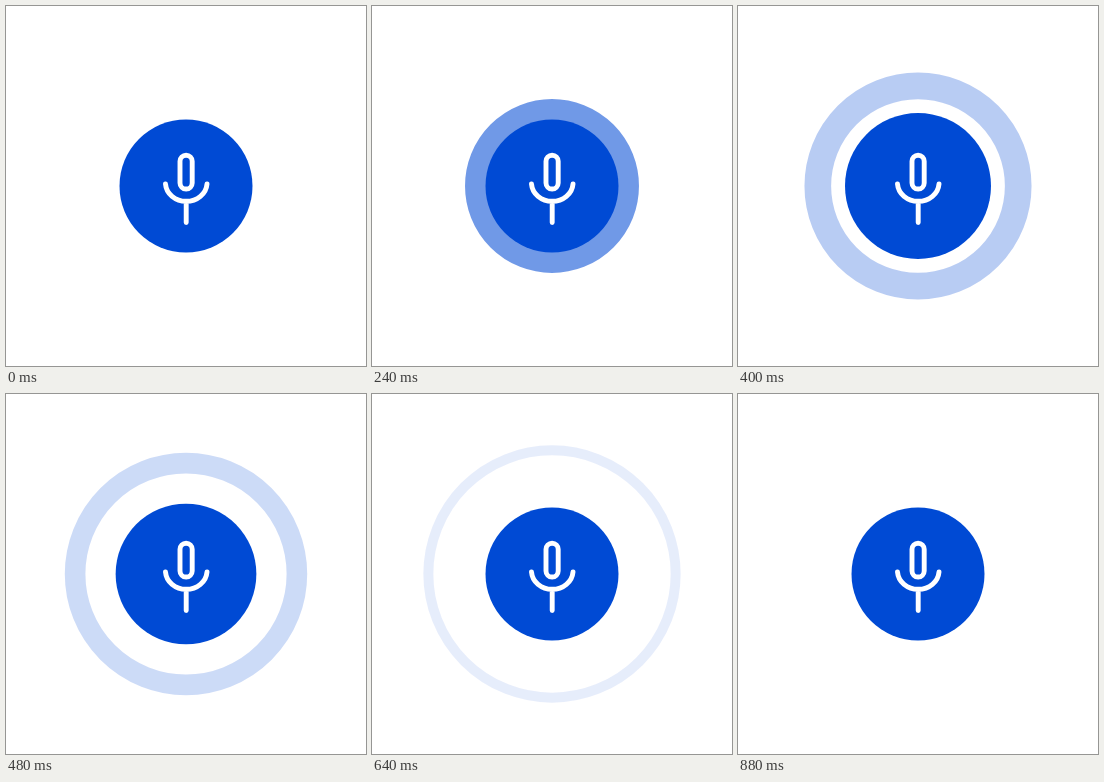
An HTML page that plays this animation: 360 px wide and 360 px high, repeating every 0.96 s.

```html
<!DOCTYPE html>
<html lang="en">
<head>
<meta charset="utf-8">
<title>Microphone pulse</title>
<style>
html, body { margin: 0; width: 100%; height: 100%; overflow: hidden; background: #fff; }
svg { display: block; width: 100vw; height: 100vh; }
</style>
</head>
<body>
<svg viewBox="0 0 360 360">
  <circle id="ring" cx="180" cy="180" fill="none" stroke="#004ad4"/>
  <circle id="disc" cx="180" cy="180" fill="#004ad4"/>
  <g fill="none" stroke="#fff" stroke-width="4.9" stroke-linecap="round">
    <rect x="174" y="149.2" width="12.2" height="33.8" rx="6.1"/>
    <path d="M159.5 178A20.8 18.6 0 0 0 201 178M180.2 197V216.5"/>
  </g>
</svg>
<script>
const STEP = 80, COUNT = 12;
const REST = 66.5, SWELL = 6.5, REACH = 130;
const ring = document.getElementById('ring');
const disc = document.getElementById('disc');

// Cubic ease-out towards REACH, arriving at step "end"
function spread(k, end, rate) {
  const left = Math.max(0, end - k) * rate;
  return Math.max(0, REACH - left ** 3);
}

// The button swells and settles around step 5
function swell(k) {
  const d = Math.min(2, Math.abs(k - 5));
  return SWELL * Math.max(0, Math.cos(d * Math.PI / 4)) ** 1.5;
}

function draw(ms) {
  const k = Math.floor(ms / STEP) % COUNT;
  const outer = spread(k, 10.3, 0.48);
  const inner = spread(k, 13.35, 0.42);
  // The wave halves in strength every two steps, then goes out
  const alpha = k < COUNT - 1 ? Math.min(1, 2 ** ((1.33 - k) / 2)) : 0;
  ring.setAttribute('r', (outer + inner) / 2);
  ring.setAttribute('stroke-width', outer - inner);
  ring.setAttribute('stroke-opacity', alpha);
  disc.setAttribute('r', REST + swell(k));
}

let start;
function tick(now) {
  if (start === undefined) start = now;
  draw(now - start);
  requestAnimationFrame(tick);
}
draw(0);
requestAnimationFrame(tick);
</script>
</body>
</html>
```
